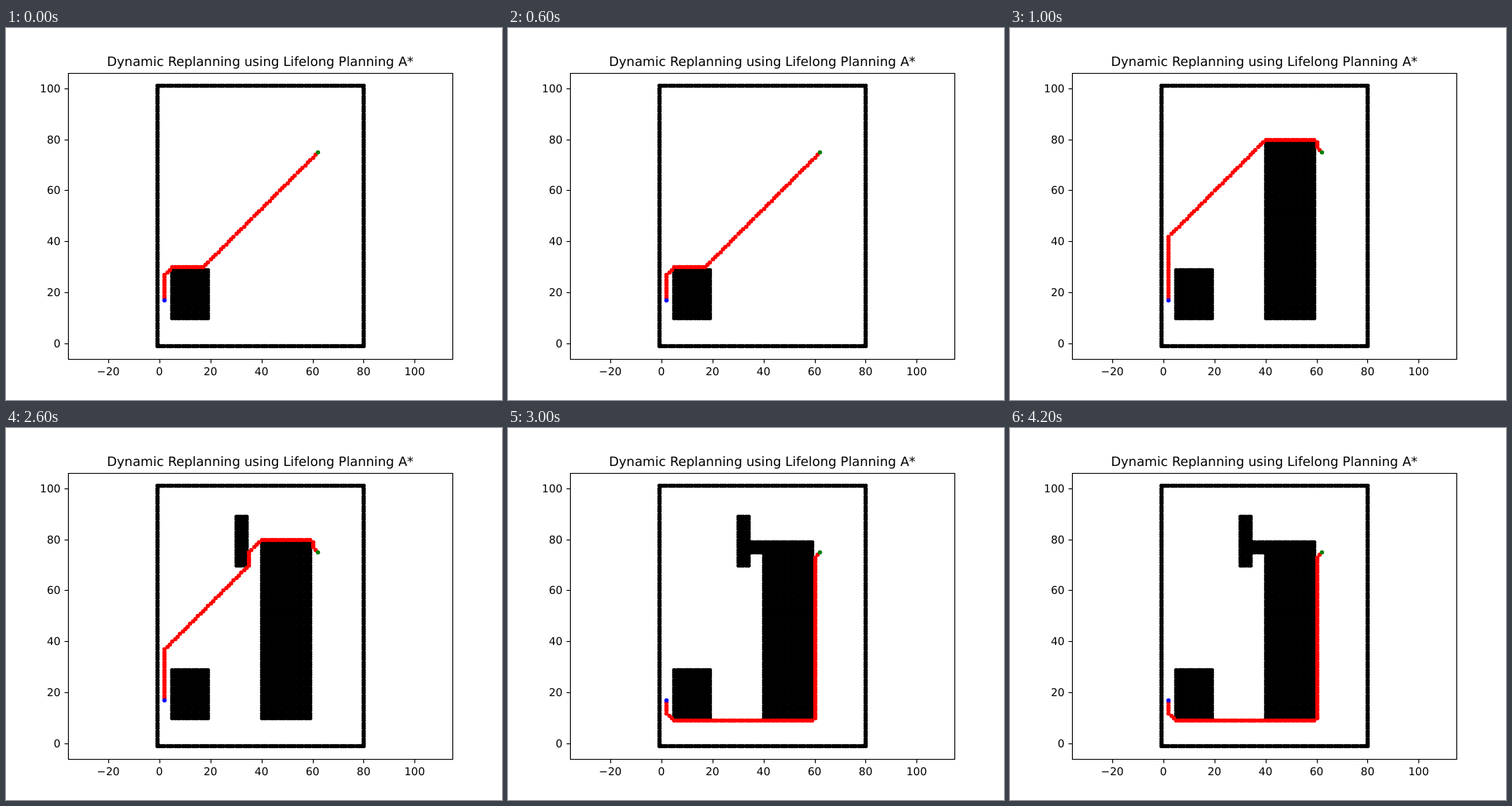
Animation of 640x480 px, one loop 5000 ms. Source, as an HTML page with a canvas:

```html
<!DOCTYPE html>
<html lang="en">
<head>
<meta charset="utf-8">
<title>Dynamic replanning</title>
<style>
  html, body { margin: 0; width: 100%; height: 100%; overflow: hidden; background: #fff; }
  #stage { position: absolute; left: 0; top: 0; width: 640px; height: 480px; overflow: hidden; }
  #strip, #axes { position: absolute; left: 0; top: 0; display: block; }
  /* the four plans sit below each other; the strip jumps up one stage at a time */
  #strip { animation: plans 5s step-end infinite; }
  @keyframes plans {
    0% { transform: translateY(0); }
    20% { transform: translateY(-480px); }
    40% { transform: translateY(-960px); }
    60%, 100% { transform: translateY(-1440px); }
  }
  #axes text {
    font: 13.889px "DejaVu Sans", sans-serif;
    text-rendering: geometricPrecision;
    text-anchor: middle;
  }
  #axes text.y { text-anchor: end; }
  #axes text.title { font-size: 16.667px; }
  #axes path { fill: none; stroke: #000; stroke-width: 1.11; }
</style>
</head>
<body>
<div id="stage">
  <canvas id="strip" width="640" height="1920"></canvas>
  <svg id="axes" width="640" height="480" viewBox="0 0 640 480">
    <path d="M80.5 58.5H576.5V427.5H80.5Z"/>
    <text class="title" x="328" y="49">Dynamic Replanning using Lifelong Planning A*</text>
  </svg>
</div>
<script>
const UNIT = 369.6 / 112.2;
const px = x => Math.round(328 + (x - 39.5) * UNIT) + 0.5;
const py = y => Math.round(427.2 - (y + 6.1) * UNIT) + 0.5;

// Axis ticks and labels
const axes = document.getElementById('axes');
function add(tag, attrs, text = '') {
  const el = document.createElementNS('http://www.w3.org/2000/svg', tag);
  for (const k in attrs) el.setAttribute(k, attrs[k]);
  el.textContent = text;
  axes.append(el);
}
const label = v => String(v).replace('-', '\u2212');
for (let v = -20; v <= 100; v += 20) {
  add('path', { d: `M${px(v)} 427.5v5` });
  add('text', { x: 328 + (v - 39.5) * UNIT, y: 448 }, label(v));
  if (v < 0) continue;
  add('path', { d: `M80.5 ${py(v)}h-5` });
  add('text', { class: 'y', x: 70.3, y: py(v) + 4.5 }, label(v));
}

// Dots
const ctx = document.getElementById('strip').getContext('2d');
function dot(x, y, color) {
  ctx.fillStyle = color;
  ctx.beginPath();
  ctx.arc(px(x), py(y), 2.778, 0, Math.PI * 2);
  ctx.fill();
}
function block([x0, y0, x1, y1]) {
  for (let x = x0; x <= x1; x++)
    for (let y = y0; y <= y1; y++) dot(x, y, '#000');
}
// One dot per grid step along straight or diagonal legs
function route(points) {
  let [x, y] = points[0];
  dot(x, y, '#f00');
  for (const [tx, ty] of points.slice(1)) {
    while (x !== tx || y !== ty) {
      x += Math.sign(tx - x);
      y += Math.sign(ty - y);
      dot(x, y, '#f00');
    }
  }
}
function border() {
  for (let x = -1; x <= 80; x++) { dot(x, -1, '#000'); dot(x, 101, '#000'); }
  for (let y = 0; y <= 100; y++) { dot(-1, y, '#000'); dot(80, y, '#000'); }
}

// Each plan adds one obstacle and finds a new route
const blocks = [
  [5, 10, 19, 29],
  [40, 10, 59, 79],
  [30, 70, 34, 89],
  [35, 75, 39, 79]
];
const overTop = [[40, 80], [59, 80], [60, 79], [60, 77], [61, 76]];
const routes = [
  [[2, 18], [2, 27], [5, 30], [17, 30], [61, 74]],
  [[2, 18], [2, 42], ...overTop],
  [[2, 18], [2, 37], [35, 70], [35, 75], ...overTop],
  [[2, 16], [2, 12], [5, 9], [59, 9], [60, 10], [60, 73], [61, 74]]
];
routes.forEach((points, i) => {
  ctx.setTransform(1, 0, 0, 1, 0, i * 480);
  border();
  blocks.slice(0, i + 1).forEach(block);
  route(points);
  dot(2, 17, '#00f');
  dot(62, 75, '#008000');
});
</script>
</body>
</html>
```
